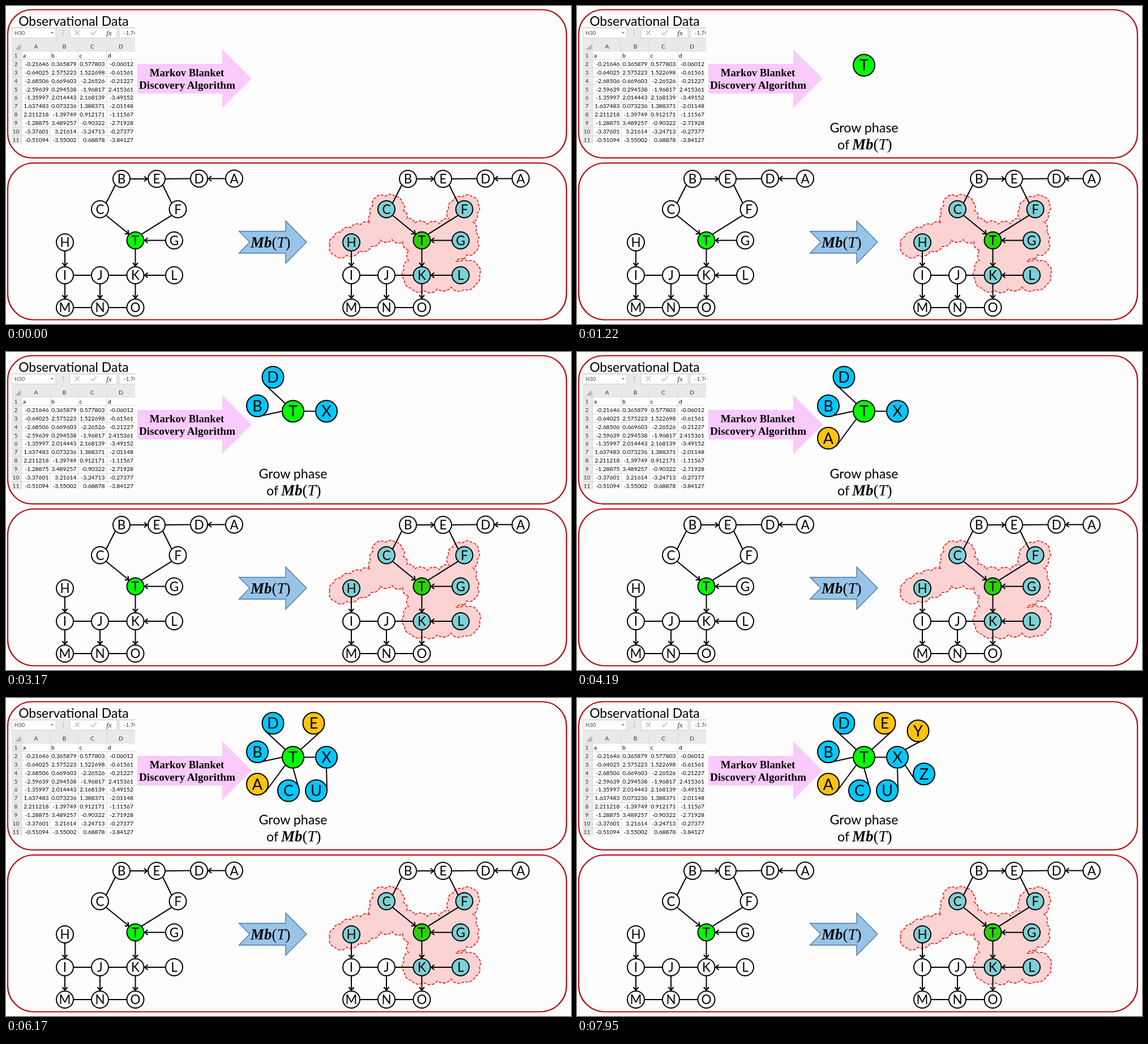
Recreate the animation shown at these times as an HTML page. Size 998x561 px, loop 7.99 s.

```html
<!DOCTYPE html>
<html lang="en">
<head>
<meta charset="utf-8">
<title>Markov blanket discovery</title>
<style>
  html, body { margin: 0; width: 100%; height: 100%; overflow: hidden; background: #fdfdfd; }
  svg { display: block; width: 100%; height: 100%; }
  text { font-family: Lato, "Open Sans", sans-serif; }
  .serif { font-family: "Liberation Serif", "Noto Serif", serif; }
  .edge { fill: none; stroke: #000; stroke-width: 2; }
</style>
</head>
<body>
<svg id="stage" viewBox="0 0 998 561"></svg>
<script>
const LOOP = 7990;
const BLUE = "#00c8ff", ORANGE = "#ffc30d", GREEN = "#00ff00", TEAL = "#7bd1d6";

const text = (x, y, size, content, attrs = 'text-anchor="middle"') =>
  `<text x="${x}" y="${y}" font-size="${size}" ${attrs}>${content}</text>`;
const rect = (x, y, w, h, attrs) =>
  `<rect x="${x}" y="${y}" width="${w}" height="${h}" ${attrs}/>`;
const line = (x1, y1, x2, y2) => `<path class="edge" d="M${x1} ${y1}L${x2} ${y2}"/>`;
const node = (x, y, r, label, fill, size) =>
  `<circle cx="${x}" cy="${y}" r="${r}" fill="${fill}" stroke="#000" stroke-width="2"/>` +
  text(x, y + size * 0.36, size, label);
const formula = (x, y) => text(x, y, 27,
  '<tspan font-weight="bold" font-style="italic">Mb</tspan>(<tspan font-style="italic">T</tspan>)',
  'class="serif"');

function panels() {
  const style = 'fill="none" stroke="#b3090f" stroke-width="2.2"';
  return rect(3, 6.5, 987, 261.5, `rx="43" ${style}`) + rect(3, 277, 987, 276.5, `rx="46" ${style}`);
}

function spreadsheet() {
  const rows = [
    "-0.21646 0.365879 0.577803 -0.06012", "-0.64025 2.575223 1.522698 -0.61561",
    "-2.68506 0.669603 -2.26526 -0.21227", "-2.59639 0.294538 -1.96817 2.415361",
    "-1.35997 2.014443 2.168139 -3.49152", "1.637483 0.073236 1.388371 -2.01148",
    "2.211218 -1.39749 0.912171 -1.11567", "-1.28875 3.489257 -0.90322 -2.71928",
    "-3.37601 3.21614 -3.24713 -0.27377", "-0.51094 -3.55002 0.68878 -3.84127"];
  const left = [28, 78, 127.5, 178], right = [75.5, 124.5, 174.5, 225];
  const grid = 'stroke="#d9d9d9" stroke-width="1" fill="none"';
  const box = 'fill="#fff" stroke="#d0d0d0"';
  const rowY = i => 79.5 + i * 14.95;
  let s = rect(10, 37, 218, 42.5, 'fill="#e9e9e9"') + rect(10, 79, 18, 164, 'fill="#e9e9e9"') +
    rect(28, 79.5, 200, 163.5, 'fill="#fff"') +
    rect(10.5, 39, 77.5, 17.5, box) + rect(113, 39, 83, 17.5, box) + rect(200, 39, 40, 17.5, box) +
    text(15, 51.3, 9.5, "H30", 'fill="#444"') + text(208, 51.3, 9.8, "-1.74", 'fill="#333"') +
    '<path d="M79 46h5l-2.5 3z" fill="#777"/>' +
    '<path d="M101 43v1.5m0 2v1.5m0 2v1.5" stroke="#999" stroke-width="1.5"/>' +
    '<path d="M122 43l8 8m0-8l-8 8M150 47l3 4 7-8" stroke="#b5b5b5" stroke-width="1.3" fill="none"/>' +
    text(182, 51.5, 13, "fx", 'class="serif" font-style="italic" text-anchor="middle" fill="#333"') +
    '<path d="M26 67v10H16z" fill="#b5b5b5"/>';
  left.forEach((x, c) => {
    s += `<path d="M${x} 63V243" ${grid}/>` +
      text(x + 25, 75.3, 10.3, "ABCD"[c], 'text-anchor="middle" fill="#333"') +
      text(x + 2, 90.7, 10.3, "abcd"[c], "");
  });
  for (let i = 0; i <= 10; i++) {
    s += `<path d="M10 ${rowY(i)}H228" ${grid}/>` +
      text(17.5, rowY(i) + 11.2, 10.3, i + 1, 'text-anchor="middle" fill="#333"');
    if (i) rows[i - 1].split(" ").forEach((v, c) =>
      s += text(right[c], rowY(i) + 11.2, 10.3, v, 'text-anchor="end"'));
  }
  return '<clipPath id="sheet"><rect x="10" y="37" width="218" height="206"/></clipPath>' +
    `<g clip-path="url(#sheet)">${s}</g>`;
}

function arrows() {
  const bold = 'class="serif" font-weight="bold" text-anchor="middle"';
  return '<path d="M232 102H382V76L434 128 382 180V154.500H232z" fill="#fbcafc"/>' +
    text(319.5, 123.5, 18.7, "Markov Blanket", bold) +
    text(320, 146, 19.2, "Discovery Algorithm", bold) +
    '<path d="M411.500 397.500H494V379L531 416.500 494 454V436H411.500L430.500 416.500z" fill="#98c4e8" stroke="#4676a3" stroke-width="1.3"/>' +
    formula(432, 426);
}

const graphNodes = {
  B: [204, 305], E: [266, 305], D: [341, 304.5], A: [403, 304.5], C: [166, 358.5], F: [303.5, 358.5],
  H: [104, 417], T: [228.5, 413.5], G: [297, 413.5], I: [104, 475], J: [166, 475], K: [228.5, 475],
  L: [297, 475], M: [104, 532], N: [166, 532], O: [228.5, 532]
};
const graphEdges = "B>E E-D A>D B-C E-F C>T F-T G>T T>K L>K K>O H>I I>M J>N I-J J-K M-N N-O";

function graphEdge([from, kind, to]) {
  const [ax, ay] = graphNodes[from], [bx, by] = graphNodes[to];
  // Connectors attach at the eight compass points of a node.
  const step = Math.PI / 4;
  const angle = Math.round(Math.atan2(by - ay, bx - ax) / step) * step;
  const dx = Math.cos(angle) * 15.5, dy = Math.sin(angle) * 15.5;
  const tipX = bx - dx, tipY = by - dy;
  let s = line(ax + dx, ay + dy, tipX, tipY);
  if (kind === ">") {
    const heading = Math.atan2(tipY - ay - dy, tipX - ax - dx) * 180 / Math.PI;
    s += `<path class="edge" d="M-6.500 -4.500L-1 0-6.500 4.500" transform="translate(${tipX} ${tipY}) rotate(${heading})"/>`;
  }
  return s;
}

function graph(offset, blanket, targetFill) {
  let s = graphEdges.split(" ").map(graphEdge).join("");
  for (const [name, [x, y]] of Object.entries(graphNodes)) {
    const fill = name === "T" ? targetFill : blanket.includes(name) ? TEAL : "#fff";
    s += node(x, y, 15, name, fill, 22.5);
  }
  return `<g transform="translate(${offset})">${s}</g>`;
}

function cloud() {
  const outline = [
    [572, 422], [579, 407], [592, 399], [609, 391], [626, 386], [643, 383], [644, 368], [648, 352],
    [653, 338], [670, 336], [687, 336], [699, 346], [702, 361], [708, 375], [722, 383], [744, 385],
    [766, 384], [783, 376], [782, 358], [789, 344], [806, 337], [824, 337], [834, 350], [832, 366],
    [825, 381], [829, 399], [833, 416], [829, 433], [813, 439], [795, 450], [815, 450], [833, 458],
    [836, 474], [829, 491], [810, 500], [786, 496], [762, 499], [738, 502], [716, 498], [704, 483],
    [703, 465], [711, 449], [712, 431], [701, 416], [682, 412], [661, 413], [645, 424], [624, 432],
    [602, 440], [581, 440]];
  let [x, y] = outline[0], d = `M${x} ${y}`;
  for (const [nx, ny] of [...outline.slice(1), outline[0]]) {
    const r = Math.hypot(nx - x, ny - y) * 0.68;
    d += `A${r} ${r} 0 0 1 ${nx} ${ny}`;
    [x, y] = [nx, ny];
  }
  return `<path d="${d}z" fill="#fbd3d3" stroke="#f01818" stroke-width="1.6" stroke-dasharray="5 2.500"/>`;
}

// Each discovery: time it appears, label, centre, colour, connector ends.
const discoveries = [
  [790, "T", 507, 104.5, GREEN],
  [1550, "B", 444, 95, BLUE, [444, 114, 488, 104.5]],
  [2310, "X", 566, 104.5, BLUE, [526, 104.5, 547, 104.5]],
  [3080, "D", 471.5, 44.5, BLUE, [458, 58, 493.5, 91]],
  [3860, "A", 444, 152, ORANGE, [458, 166, 493.5, 118]],
  [4620, "U", 548, 163.5, BLUE, [566, 123.5, 567, 163.5]],
  [5410, "C", 499, 163.5, BLUE, [507, 123.5, 516, 155]],
  [6170, "E", 543.5, 44.5, ORANGE, [557, 58, 520.5, 91]],
  [6930, "Z", 613, 134, BLUE, [579.5, 118, 599, 147.5]],
  [7720, "Y", 602.5, 58, ORANGE, [616, 71.5, 579.5, 91]]
];

function discovery([, label, x, y, fill, ends]) {
  const caption = label === "T"
    ? text(507, 222.5, 23.2, "Grow phase") + text(460, 252.5, 23.2, "of", "") + formula(486, 253) : "";
  return `<g class="found">${ends ? line(...ends) : ""}${node(x, y, 19, label, fill, 27)}${caption}</g>`;
}

const stage = document.getElementById("stage");
stage.innerHTML = panels() + text(119.5, 34.5, 22.9, "Observational Data") + spreadsheet() + arrows() +
  graph(0, "", GREEN) + cloud() + graph(506, "CFHGKL", "#2bd204") +
  discoveries.map(discovery).join("");

const found = [...stage.querySelectorAll(".found")];
function draw(now) {
  const t = now % LOOP;
  found.forEach((g, i) => g.setAttribute("visibility", t >= discoveries[i][0] ? "visible" : "hidden"));
  requestAnimationFrame(draw);
}
draw(performance.now());
</script>
</body>
</html>
```
